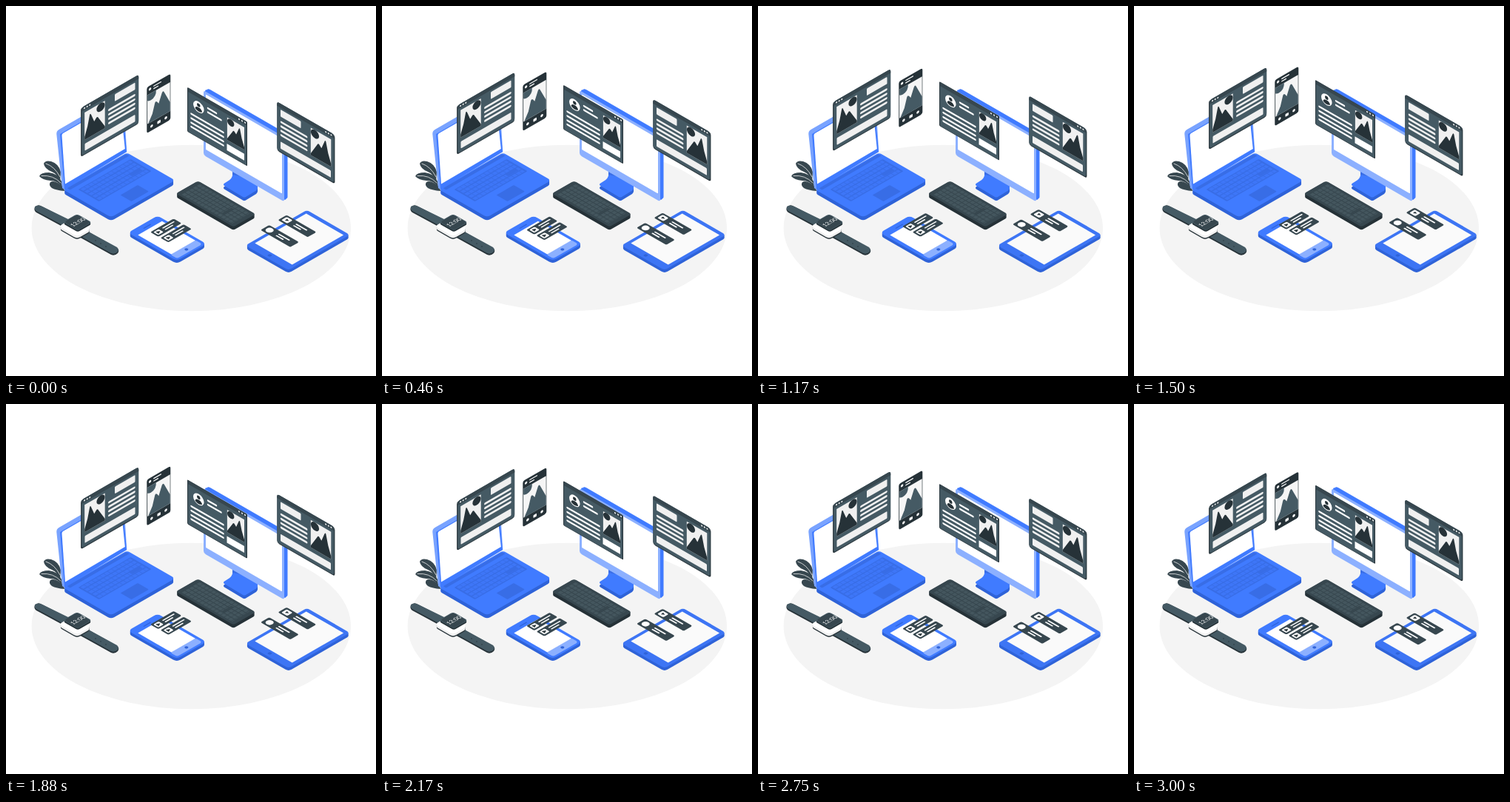
These frames come from a looping animation (500 px wide and 500 px high, 3040 ms). An HTML page:

```html
<!DOCTYPE html>
<html lang="en">
<head>
<meta charset="utf-8">
<title>Devices</title>
<style>
html, body { margin: 0; width: 100%; height: 100%; overflow: hidden; background: #fff; }
svg { display: block; width: 100vw; height: 100vh; }
</style>
</head>
<body>
<svg id="stage" viewBox="0 0 500 500" xmlns="http://www.w3.org/2000/svg"></svg>
<script>
const BLUE = '#407bff', LIGHT = '#79a3ff', SOFT = '#8cb0ff', DEEP = '#2f63d8', SHADE = '#386de6';
const SLATE = '#455a64', DARK = '#37474f', INK = '#263238', PALE = '#f0f0f0', WHITE = '#fff';
const LOOP = 3040, LIFT = 10, S = 0.577;

const path = (d, fill, extra = '') => `<path d="${d}" fill="${fill}" ${extra}/>`;
const line = (d, color, width, extra = '') =>
  path(d, 'none', `stroke="${color}" stroke-width="${width}" stroke-linecap="round" stroke-linejoin="round" ${extra}`);
const rect = (x, y, w, h, fill, r = 0) =>
  `<rect x="${x}" y="${y}" width="${w}" height="${h}" rx="${r}" fill="${fill}"/>`;
const dot = (x, y, r, fill) => `<circle cx="${x}" cy="${y}" r="${r}" fill="${fill}"/>`;
const group = (matrix, ...parts) => `<g transform="matrix(${matrix})">${parts.join('')}</g>`;

// Isometric planes: walls rising or falling to the right, and the floor.
const rising = (x, y, ...parts) => group([1, -S, 0, 1, x, y], ...parts);
const falling = (x, y, ...parts) => group([1, S, 0, 1, x, y], ...parts);
const mirrored = (x, y, ...parts) => group([-1, -S, 0, 1, x, y], ...parts);
const floor = (x, y, ...parts) => group([1, -S, 1, S, x, y], ...parts);

// A rounded slab lying on the floor, with its thickness below it.
function slab(x, y, w, h, depth, top, side, r) {
  let out = '';
  for (let z = depth; z > 0; z--) out += floor(x, y + z, rect(0, 0, w, h, side, r));
  return out + floor(x, y, rect(0, 0, w, h, top, r));
}

function plant() {
  return path('M73 238Q70 227 62 224Q52 220 51 213Q53 208 61 210Q71 213 74 224Z', DARK) +
    path('M76 245Q70 236 60 236Q49 235 45 230Q47 225 58 225Q70 226 75 237Z', DARK) +
    path('M79 250Q68 249 62 246Q57 242 60 238Q66 234 78 245Z', DARK) +
    line('M54 213Q66 217 73 231M48 229.5Q64 228 74 239', PALE, 0.8);
}

function laptop() {
  const rows = [0, 1, 2, 3, 4].map(i => `M12 ${13 + i * 5.4}H79`).join('');
  return path('M68.3 173Q68 169 71.5 167L152 120.5Q158 117.5 158.6 123L163.3 197L79 248L76 246Z', LIGHT) +
    path('M73 173L156 125L163 197L79 248Z', BLUE) +
    path('M75.5 175Q75.5 173 77 172L154 127.5L160.8 193L80 240.5Z', WHITE) +
    slab(77, 248, 86.5, 65, 5, BLUE, DEEP, 4) +
    floor(77.5, 248,
      rect(4, 1, 80, 4, SHADE, 1),
      rect(10, 10, 71, 28, SHADE, 1),
      line(rows, BLUE, 4, 'style="stroke-linecap:butt" stroke-dasharray="4.6 .7" stroke-opacity=".7"'),
      rect(62, 26, 14, 5, SHADE),
      rect(32, 45, 23.5, 15, SHADE, 1));
}

function monitor() {
  const stand = 'M306 220V229Q305 234 300 236.5L294.5 240Q293 241.5 295 243L320 258Q322 259 324 258L338 249.5Q340.5 247.5 340 243L339 238Z';
  return `<g transform="translate(0 4.5)">${path(stand, DEEP)}</g>` +
    path(stand, BLUE) +
    path('M306 220L339 239V241.5Q330 232 306 228Z', SHADE) +
    falling(271.5, 112, rect(0, -1.5, 109, 88.5, BLUE, 4)) +
    falling(269, 113, rect(0, -1.5, 110, 88.5, BLUE, 4)) +
    falling(267, 114, rect(0, 0, 109, 87.5, SOFT, 3), rect(3, 3.8, 103, 74.5, WHITE, 1));
}

function keyboard() {
  const rows = [0, 1, 2, 3, 4].map(i => `M${5 + i * 5} 5V73`).join('');
  return slab(229.5, 253.6, 30, 77.8, 4.5, DARK, INK, 3) +
    floor(229.5, 253.6,
      line(rows, '#53676f', 3.9, 'style="stroke-linecap:butt" stroke-dasharray="4 .8" stroke-opacity=".5"'),
      rect(8, 54, 13, 3.5, DARK));
}

function watch() {
  return path('M39 272Q43 267 49 271L86 290L78 299L41 279Q37 276 39 272Z', INK) +
    path('M39 271Q43 268 49 271L86 289L78 297L41 277Q38 275 39 271Z', SLATE) +
    path('M106 302L150 327Q154 330 151 334Q147 338 142 336L97 311Z', INK) +
    path('M106 302L150 326Q153 329 151 332Q147 336 142 334L97 309Z', SLATE) +
    dot(121, 317, 0.7, INK) + dot(128, 321, 0.7, INK) + dot(135, 325, 0.7, INK) +
    slab(71.5, 299, 19, 24.5, 3, INK, INK, 4) +
    slab(71.5, 297.5, 19, 24.5, 3, WHITE, PALE, 4) +
    slab(77, 292, 19, 20, 2, SLATE, INK, 3) +
    floor(77, 292,
      rect(0.8, 0.8, 17.4, 18.4, DARK, 3),
      `<text x="10" y="12.4" text-anchor="middle" font-family="Lato, Inter, sans-serif" font-size="6.8" fill="${WHITE}">12:00</text>`);
}

function phone() {
  return slab(164.8, 306.4, 40, 66, 4, BLUE, DEEP, 5) +
    floor(164.8, 306.4,
      rect(3, 54, 34, 9.5, SOFT, 3),
      rect(4, 9.5, 32.5, 45, WHITE),
      line('M16 5.5H25', DEEP, 1.1),
      dot(20, 59, 1.8, DEEP));
}

function tablet() {
  return slab(323.6, 323.6, 83, 58.2, 4, '#3d75f4', DEEP, 4) +
    floor(323.6, 323.6, rect(9, 3.6, 69.5, 50.5, '#fafafa', 0.5), dot(4.8, 28, 1.9, DEEP));
}

// Landscape thumbnail, 27.5 by 37.
function landscape() {
  return rect(0, 0, 27.5, 37, PALE) +
    dot(21.8, 5.4, 5.6, INK) +
    path('M0 33L4 21L7 7Q8 5 9.2 9L13 19.5L16 16.2Q17.5 15 19 18.5L27.5 34.5V37H0Z', INK);
}

function browser() {
  return rect(-0.4, 0.4, 78, 65.8, INK, 3) +
    rect(0.7, 0, 77, 65.2, SLATE, 3) +
    path('M.7 7V3Q.7 0 3.7 0H74.7Q77.7 0 77.7 3V5.5H.7Z', DARK) +
    [4.6, 8.2, 11.8].map(x => dot(x, 3, 1, WHITE)).join('') +
    group([1, 0, 0, 1, 4.7, 9], landscape()) +
    rect(45.5, 8, 27.5, 9.5, PALE, 1) +
    line([24.6, 30.5, 36.4, 42.3].map(y => `M38 ${y}H71.8`).join(''), PALE, 2.9) +
    rect(5, 51.3, 68, 9.5, PALE, 1);
}

function profile() {
  return rect(0, 0, 81, 60, INK, 1.5) +
    rect(0.8, 0.8, 79.2, 58.6, SLATE, 1.5) +
    rect(0.8, 0.5, 79.4, 5, DARK) +
    [70, 74, 78].map(x => dot(x, 2.9, 1, WHITE)).join('') +
    dot(15.3, 18, 7.3, WHITE) + dot(15.3, 15.5, 2.3, INK) +
    path('M10.5 22.3Q11 18.5 15.3 18.5Q19.6 18.5 20.1 22.3Q15.5 26 10.5 22.3Z', INK) +
    line('M28 12.5H39M28 18H45.5', WHITE, 2.5) +
    line('M5.5 33H48.5M5.5 39H48.5M5.5 45H48.5M5.5 50.5H48.5', WHITE, 2.5) +
    group([-0.84, 0, 0, 0.82, 77, 9.8], landscape()) +
    rect(53.5, 45.5, 23.5, 9, WHITE);
}

function mobile() {
  return rect(0, 0, 32, 62, INK, 2.5) +
    rect(0.8, 11, 30.6, 39, '#f5f5f5') +
    path('M.8 11H12.5Q13 20 5.5 20.5Q2 20.3.8 18.5Z', SLATE) +
    path('M2 50L7.5 40L11 27Q12.5 24 16 31L20.5 19Q22 16.5 23.5 20L31.4 38V50Z', SLATE) +
    dot(4.3, 4.8, 1.7, WHITE) +
    line('M9.5 3.6H19M9.5 7H15', WHITE, 1.4) +
    dot(6.5, 56, 1.8, WHITE) + rect(14.2, 54.2, 4.4, 3.8, WHITE, 0.6) + dot(25.7, 56, 1.8, WHITE);
}

const play = (x, y) => path(`M${x - 1.4} ${y - 1.8}L${x + 2} ${y}L${x - 1.4} ${y + 1.8}Z`, INK,
  `stroke="${INK}" stroke-width=".5" stroke-linejoin="round"`);

const phoneChip = (x, y) => floor(x, y,
  rect(0, 0, 31.5, 10.8, DARK, 1.6),
  rect(2, 2, 7.2, 6.8, WHITE, 1.2), play(5.5, 5.4),
  line('M13.5 3.7H28M13.5 7.1H23', WHITE, 1.5));

const tabletChip = (x, y, icon) => floor(x, y,
  rect(0, 0, 11.8, 40.2, DARK, 1.8), icon,
  line('M7.6 17.5V31M4.2 17.5V26', WHITE, 1.7));

const hub = dot(5.9, 6.4, 3.9, WHITE);
const clip = rect(2.2, 2.4, 7.4, 8, WHITE, 1.4) + path('M4.1 5.3L7.7 4.8L6.4 8.6Z', INK);

document.getElementById('stage').innerHTML =
  `<ellipse cx="250.3" cy="300" rx="215.7" ry="112.3" fill="#f4f4f4"/>` +
  plant() + laptop() + monitor() + keyboard() + watch() + phone() + tablet() +
  '<g id="floating">' +
  rising(101.5, 137.6, browser()) +
  rising(190.3, 110, mobile()) +
  falling(245, 109.7, profile()) +
  mirrored(444, 174, browser()) +
  phoneChip(195, 305.6) + phoneChip(208.6, 313.3) +
  tabletChip(367.4, 289.2, clip) + tabletChip(343.9, 302.7, hub) +
  '</g>';

const floating = document.getElementById('floating');

function render(time) {
  const phase = (time % LOOP) / LOOP;
  const rise = LIFT * (1 - Math.abs(1 - 2 * phase));
  floating.setAttribute('transform', `translate(0 ${-rise.toFixed(3)})`);
}

const start = performance.now();
function tick() {
  render(performance.now() - start);
  requestAnimationFrame(tick);
}
tick();
</script>
</body>
</html>
```
